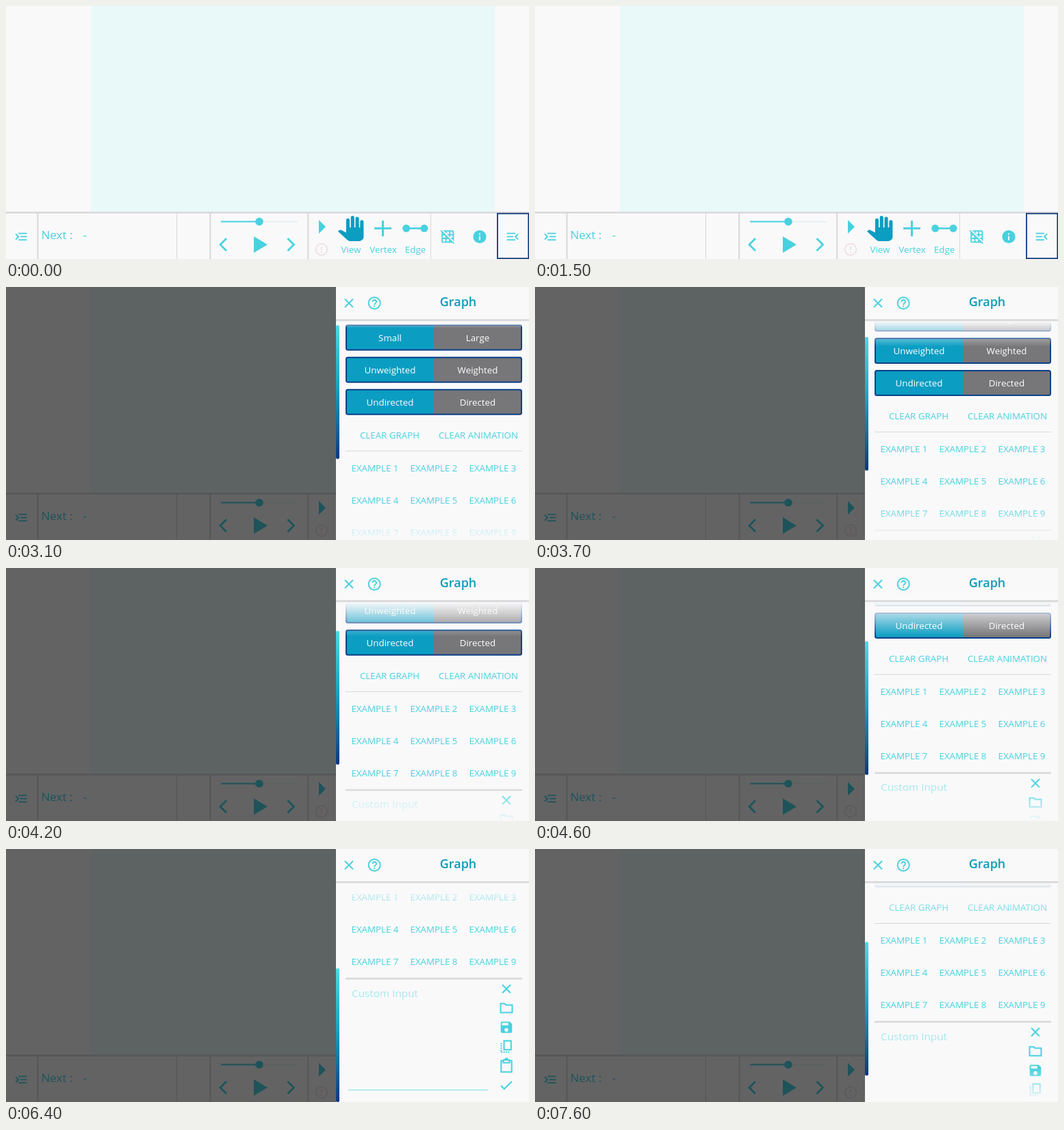
An HTML page that plays this animation: 764 by 369 pixels, repeating every 8 s.

```html
<!DOCTYPE html>
<html lang="en">
<head>
<meta charset="utf-8">
<title>Graph editor panel</title>
<style>
  html, body { margin: 0; width: 100%; height: 100%; overflow: hidden; }
  body { background: #f9f9fa; }
  svg { position: absolute; left: 0; top: 0; display: block; fill: #48d1df; font: 13.333px "Open Sans", sans-serif; }
  .stage, #dim, #panel { position: absolute; left: 0; top: 0; width: 764px; height: 369px; overflow: hidden; }
  #dim { background: #000; }
  #panel { width: 282px; background: #f9f9fa; }
  #view { position: absolute; left: 0; top: 50px; width: 282px; height: 319px; overflow: hidden; }
  #bar { position: absolute; left: 0; top: 50px; width: 5px; height: 195px; border-radius: 2px;
         background: linear-gradient(#4dd9e4, #1aa3c4 45%, #0a3684); }
  .line { fill: none; stroke: #48d1df; stroke-width: 2; }
  .rule { fill: #d8d8da; }
  .mid { text-anchor: middle; }
</style>
</head>
<body>
<div class="stage">
  <svg width="764" height="369">
    <defs>
      <path id="menu" d="M3 18h13v-2H3zM3 13h10v-2H3zM3 6v2h13V6zM21 15.6L17.4 12 21 8.4 19.6 7l-5 5 5 5z"/>
    </defs>
    <rect x="124" width="590" height="301" fill="#e9f8f9"/>
    <g class="rule">
      <rect y="300" width="764" height="2.5"/>
      <rect x="45.5" y="301" width="2" height="68"/>
      <rect x="249" y="301" width="1" height="68"/>
      <rect x="297.3" y="301" width="2" height="68"/>
      <rect x="440.3" y="301" width="2" height="68"/>
      <rect x="620" y="301" width="1" height="68"/>
    </g>
    <rect x="718" y="302.7" width="45.3" height="65.5" fill="none" stroke="#123878" stroke-width="1.8"/>
    <use href="#menu" transform="translate(33.4 325) scale(-.95 .95)"/>
    <use href="#menu" transform="translate(728.8 325) scale(.95)"/>
    <g font-size="17" font-weight="500">
      <text x="51.5" y="340">Next :</text>
      <text x="112.5" y="340">-</text>
    </g>

    <path d="M370 314.5h56" class="line" style="stroke:#e4f2f3"/>
    <path d="M314 314.5h56" class="line"/>
    <circle cx="370" cy="314.5" r="5.8"/>
    <path d="M322 339l-9 9 9 9M411.500 339l9 9-9 9" class="line" style="stroke-width:2.7"/>
    <path d="M362 336l20 12-20 12zM457 312l10 10-10 10z"/>

    <g fill="#eee0e1">
      <circle cx="461" cy="355" r="8.3" fill="none" stroke="#eee0e1" stroke-width="1.8"/>
      <path d="M460 350.500h2v5.500h-2zM460 358h2v2h-2z"/>
    </g>

    <path fill="#0b9dc2" transform="translate(483.3 306) scale(1.7 1.54)" d="M23 5.5V20c0 2.2-1.8 4-4 4h-7.3c-1.1 0-2.1-.4-2.85-1.2L1 14.8l1.3-1.25c.4-.3.9-.4 1.4-.1L8 15.900V4a1.500 1.500 0 0 1 3 0v7h1V1.500a1.500 1.500 0 0 1 3 0V11h1V2.500a1.500 1.500 0 0 1 3 0V11h1V5.500a1.500 1.500 0 0 1 3 0z"/>
    <path d="M538 324.300h25M550.500 313v23" class="line" style="stroke-width:3"/>
    <path d="M585 324.300h26" class="line" style="stroke-width:2.6"/>
    <circle cx="584.7" cy="324.300" r="5.500"/>
    <circle cx="611" cy="324.300" r="5.500"/>
    <g class="mid" font-weight="500">
      <text x="504" y="360">View</text>
      <text x="551" y="360">Vertex</text>
      <text x="598" y="360">Edge</text>
    </g>

    <path transform="translate(634.5 325.500) scale(.9)" d="M8 4v1.450l2 2V4h4v4h-3.450l2 2H14v1.450l2 2V10h4v4h-3.450l2 2H20v1.450l2 2V4c0-1.100-.9-2-2-2H4.550l2 2H8zm8 0h4v4h-4V4zM1.270 1.270L0 2.550l2 2V20c0 1.100.9 2 2 2h15.460l2 2 1.260-1.270L1.270 1.270zM10 12.550L11.450 14H10v-1.450zm-6-6L5.450 8H4V6.550zM8 20H4v-4h4v4zm0-6H4v-4h3.450l.55.55V14zm6 6h-4v-4h3.450l.55.540V20zm2 0v-1.460L17.460 20H16z"/>
    <circle cx="692" cy="336.500" r="9.600"/>
    <path fill="#f9f9fa" d="M691 335.500h2v6h-2zM691 331.500h2v2h-2z"/>
  </svg>

  <div id="dim"></div>

  <div id="panel">
    <div id="view"><svg id="list" width="282" height="522"></svg></div>
    <div id="bar"></div>
    <svg width="282" height="50">
      <rect y="47" width="282" height="2.600" class="rule"/>
      <path d="M13 17.500l12 12m0-12l-12 12" class="line"/>
      <path transform="translate(44.800 12.100) scale(.95)" d="M11 18h2v-2h-2zM12 2a10 10 0 1 0 0 20a10 10 0 1 0 0-20zm0 18a8 8 0 1 1 0-16a8 8 0 1 1 0 16zm0-14c-2.200 0-4 1.800-4 4h2c0-1.100.9-2 2-2s2 .9 2 2c0 2-3 1.750-3 5h2c0-2.250 3-2.500 3-5 0-2.200-1.800-4-4-4z"/>
      <text x="178.500" y="28" class="mid" font-size="18" font-weight="600" fill="#0b9bb9">Graph</text>
    </svg>
  </div>
</div>

<script>
const $ = id => document.getElementById(id);
const LOOP = 8000, MAX_SCROLL = 203, FADE = 50;

// List contents; y is measured from the top of the list, 50 px below the stage top.
const label = (s, x, y, fill = '#48d1df') =>
  `<text class="mid" x="${x}" y="${y + 4.8}" fill="${fill}">${s}</text>`;
const rule = (y, h) => `<rect class="rule" x="14" y="${y}" width="258" height="${h}"/>`;
const toggle = (on, off, y) => `
  <rect x="15" y="${y - 18}" width="256" height="36" rx="2.5" fill="#777678"/>
  <path d="M143 ${y - 18}H15v36h128z" fill="#0b9dc2"/>
  <rect x="15" y="${y - 18}" width="256" height="36" rx="2.5" fill="none" stroke="#0b3f88" stroke-width="2"/>
  ${label(on, 79, y, '#fff')}${label(off, 207, y, '#fff')}`;
const icon = (y, d, filled) =>
  `<path class="${filled ? '' : 'line'}" transform="translate(249 ${y})" d="${d}"/>`;

let html = toggle('Small', 'Large', 33) + toggle('Unweighted', 'Weighted', 80) +
  toggle('Undirected', 'Directed', 127) +
  label('CLEAR GRAPH', 78.5, 175) + label('CLEAR ANIMATION', 208, 175) + rule(198, 1);
for (let i = 0; i < 9; i++)
  html += label('EXAMPLE ' + (i + 1), 57 + 86 * (i % 3), 223 + 47 * Math.floor(i / 3));
html += rule(340.8, 2.5) +
  '<text x="23" y="368.5" font-size="15.3" fill="#a6e7ed">Custom Input</text>' +
  '<rect x="18" y="504" width="204" height="1" fill="#7fdde6"/>' +
  icon(357, 'M-6-6L6 6M6-6L-6 6') +
  icon(385, 'M-8.500-6.500h6l2 2h9v11h-17z') +
  icon(413, 'M4.700-8.300H-6.500a1.800 1.800 0 0 0-1.800 1.800v13a1.800 1.800 0 0 0 1.800 1.800h13a1.800 1.800 0 0 0 1.800-1.800V-4.700zM0 6.500a2.800 2.800 0 1 1 0-5.600a2.800 2.800 0 1 1 0 5.600zM2.800-2.800H-6.500v-3.700h9.300z', true) +
  icon(441, 'M-3.500-8.300h10.300v13h-10.300z') +
  `<path class="line" stroke-dasharray="2 1.300" transform="translate(249 441)" d="M-7.500-5v13.300h11.500"/>` +
  icon(469, 'M-4-7.300h-3.700v16.500h15.400v-16.500h-3.700M-4.500-8.300h9v4h-9zM-2-8.500a2 2 0 0 1 4 0') +
  icon(498, 'M-8 0l4.700 5L8-6');
$('list').innerHTML = html;

// Linear interpolation through [time, value] points, held at both ends.
function track(points, t) {
  const i = points.findIndex(p => p[0] > t);
  if (i < 0) return points[points.length - 1][1];
  if (!i) return points[0][1];
  const [a, from] = points[i - 1], [b, to] = points[i];
  return from + (to - from) * (t - a) / (b - a);
}

// The CSS "ease" curve, solved by bisection.
function ease(x) {
  let lo = 0, hi = 1;
  const curve = (s, a, b) => 3 * (1 - s) ** 2 * s * a + 3 * (1 - s) * s * s * b + s ** 3;
  for (let i = 0; i < 20; i++) {
    const m = (lo + hi) / 2;
    if (curve(m, .25, .25) < x) lo = m; else hi = m;
  }
  return curve(lo, .1, 1);
}

const scrollPath = [[2900, 0], [3700, 37], [4600, 93], [5800, MAX_SCROLL], [6800, MAX_SCROLL], [7600, 140]];

function draw() {
  const t = performance.now() % LOOP;
  const open = ease(track([[1750, 0], [2050, 1]], t));
  const y = track(scrollPath, t);
  const top = Math.min(FADE, y), bottom = Math.min(FADE, MAX_SCROLL - y);
  $('dim').style.opacity = .6 * open;
  $('panel').style.transform = `translateX(${764 - 282 * open}px)`;
  $('list').style.transform = `translateY(${-y}px)`;
  $('bar').style.transform = `translateY(${y * 124 / MAX_SCROLL}px)`;
  $('view').style.webkitMaskImage =
    `linear-gradient(transparent, #000 ${top}px, #000 ${319 - bottom}px, transparent)`;
  if (!top || !bottom) {
    const stops = top ? `transparent, #000 ${top}px` : `#000, #000 ${319 - bottom}px, transparent`;
    $('view').style.webkitMaskImage = `linear-gradient(${stops})`;
  }
  requestAnimationFrame(draw);
}
draw();
</script>
</body>
</html>
```
